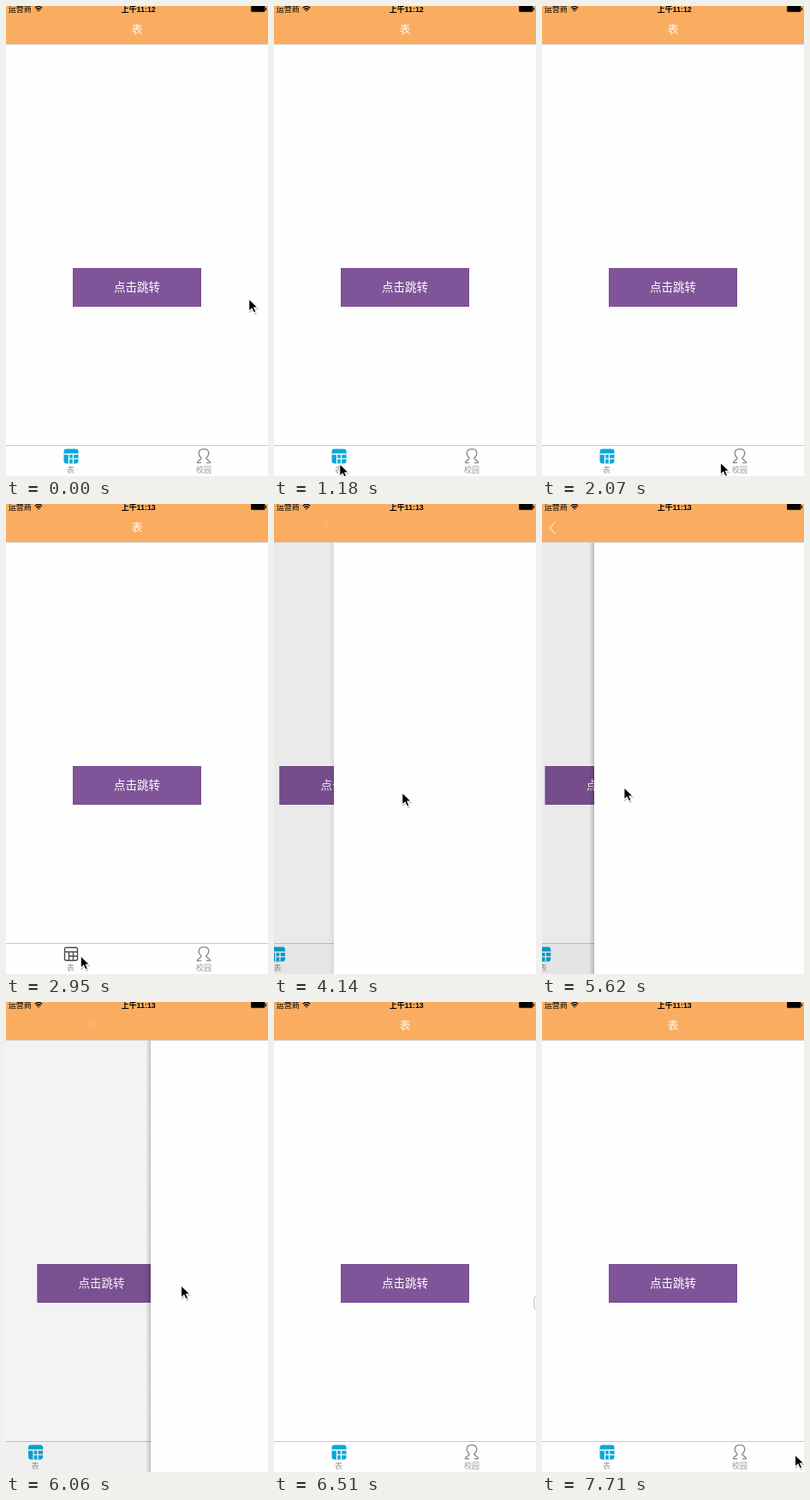
An HTML page that plays this animation: 306x547 px, repeating every 7810 ms.

```html
<!DOCTYPE html>
<html lang="zh-CN">
<head>
<meta charset="utf-8">
<style>
html, body { margin: 0; width: 100%; height: 100%; overflow: hidden; background: #fefefe; }
svg { display: block; width: 306px; height: 547px; }
text { font-family: "Noto Sans CJK SC", "Noto Sans CJK", sans-serif; text-anchor: middle; }
.status { font-size: 9px; }
#clock { font: 700 8.9px "Liberation Sans", "Noto Sans CJK SC", sans-serif; }
.label { font-size: 9px; fill: #999; }
#title { font-size: 12.5px; font-weight: 500; fill: #fff; }
</style>
</head>
<body>
<svg viewBox="0 0 306 547">
  <defs>
    <linearGradient id="shade">
      <stop offset="0" stop-opacity="0"/>
      <stop offset="1" stop-opacity=".2"/>
    </linearGradient>
  </defs>

  <g id="home">
    <rect width="306" height="547" fill="#fefefe"/>
    <g id="button">
      <rect x="78" y="305" width="150" height="45" fill="#7f5498"/>
      <rect x="78.5" y="305.5" width="149" height="44" fill="none" stroke="#784f90"/>
      <text x="153" y="332.3" font-size="13.5" fill="#fff">点击跳转</text>
    </g>
    <path d="M0 511.5H306" stroke="#c8c8c8"/>
    <g id="tableOn">
      <rect x="67.5" y="515.5" width="17" height="17" rx="3" fill="#08a9d9"/>
      <path d="M67.5 521.5H84.5M73.5 521.5V532.5M78.5 521.5V532.5M73.5 526.8H84.5" stroke="#fff" stroke-width="1.3"/>
    </g>
    <g id="tableOff" fill="none" stroke-width="1.4">
      <rect x="68.5" y="516.3" width="15" height="15" rx="2"/>
      <path d="M68.5 521.3H83.5M73.5 521.3V531M78.5 521.3V531M73.5 526.3H83.5"/>
    </g>
    <path id="person" stroke-width="1.4" stroke-linejoin="round" d="M228.3 526.3C223.8 522 224 515.6 231 515.6S238.2 522 233.7 526.3C234.5 528.8 238.6 528.6 238.6 531.6H234M228.3 526.3C227.5 528.8 223.4 528.6 223.4 531.6H228"/>
    <text class="label" x="75.5" y="543.3">表</text>
    <text class="label" x="231" y="543.3">校园</text>
    <g id="dim">
      <rect width="306" height="547" opacity=".1"/>
      <rect y="512" width="306" height="35" opacity=".03"/>
    </g>
  </g>

  <g id="page">
    <rect id="shadow" x="-6" width="6" height="547" fill="url(#shade)"/>
    <rect width="306" height="547" fill="#fefefe"/>
  </g>

  <rect width="306" height="44" fill="#faad61"/>
  <path d="M0 44.5H306" stroke="#cdc8c4"/>
  <path id="back" d="M15.5 21L8.8 27.8L15.5 34.6" fill="none" stroke="#fff" stroke-width="1.6"/>
  <text id="title" y="32">表</text>
  <text class="status" x="16.3" y="7.2">运营商</text>
  <g fill="none" stroke="#000" stroke-width="1.3">
    <path d="M33.8 2.4Q38 -1.6 42.2 2.4M35.4 4.2Q38 1.8 40.6 4.2"/>
    <path d="M37 5.3H39L38 6.3Z" fill="#000" stroke-width=".6"/>
  </g>
  <text id="clock" x="154.8" y="7"></text>
  <rect x="286.3" y="-.5" width="16" height="7.3" rx="1.2" stroke="#000" stroke-opacity=".4" stroke-width=".8"/>
  <path d="M303.6 2V5" stroke="#000"/>

  <g id="cursor">
    <path d="M1 2V17.5L4.7 14.3L7 19L9.9 17.8L7.7 13H12.5Z" opacity=".25"/>
    <path d="M.7 .8V15.2L4.1 12.1L6.4 17.1L9 16L6.8 11.1H11.3Z" stroke="#fff" stroke-width="1.1"/>
  </g>
  <rect id="edge" x="304" y="342.5" width="12" height="15" rx="2" fill="#fff" stroke="#b8b8b8"/>
</svg>

<script>
const LOOP = 7810, START = 450, STEP = 147.8, SLACK = 12, WIDTH = 306;
const PUSH = 23, DRAG = 32, DROP = 40, REST = 41;
const CYAN = "#08a9d9", GREY = "#8a8a8a";
const el = id => document.getElementById(id);
const set = (id, attrs) => {
  for (const key in attrs) el(id).setAttribute(key, attrs[key]);
};
const show = (id, on) => set(id, { opacity: on ? 1 : 0 });
const clamp = v => Math.min(1, Math.max(0, v));
const ease = f => f * f * (3 - 2 * f);

// Places where the pointer turns or rests: step, x, y
const stops = [
  [-1, 283, 340], [5, 76, 532], [8, 76, 532], [12, 232, 530], [15, 228, 530],
  [17, 86.5, 525], [19, 80, 522], [22, 149, 335], [26, 149, 335],
  [DRAG, 30, 329], [DROP, 236, 329], [REST, 310, 342], [45, 292, 560]
];

function pointer(k) {
  const i = Math.max(1, stops.findIndex(s => s[0] >= k));
  const a = stops[i - 1], b = stops[i], f = ease((k - a[0]) / (b[0] - a[0]));
  return [a[1] + (b[1] - a[1]) * f, a[2] + (b[2] - a[2]) * f];
}

function stepAt(t) {
  if (t < START) return -1;
  const k = Math.floor((t - START + SLACK) / STEP);
  return k > REST ? Math.max(REST, k - 5) : k;
}

function pageX(k, x) {
  if (k < PUSH || k >= DROP) return WIDTH;
  return k < DRAG ? WIDTH * 0.478 ** (k - PUSH) : Math.max(0, x - 34.5);
}

function draw(k) {
  const [x, y] = pointer(k);
  const left = pageX(k, x), p = left / WIDTH;
  const pushing = k < DRAG;
  const campus = k >= 12 && k < 17, pressed = k === 17;

  set("cursor", { transform: `translate(${x} ${y})` });
  show("edge", k === REST);
  set("home", { transform: `translate(${-0.303 * (WIDTH - left)} 0)` });
  set("dim", { opacity: 1 - p });
  set("page", { transform: `translate(${Math.round(left)} 0)` });
  show("page", p < 1);
  set("shadow", { opacity: pushing ? 0.3 : 1 });

  show("button", !campus);
  show("tableOn", !campus && !pressed);
  show("tableOff", campus || pressed);
  set("tableOff", { stroke: pressed ? "#4c4c4c" : GREY });
  set("person", { stroke: campus ? CYAN : GREY, fill: campus ? CYAN : "none" });

  const titleAlpha = p === 1 ? 1 : pushing ? p / 3 : clamp(2 * p - 1);
  set("title", { x: 34 + 119 * p, opacity: titleAlpha });
  el("title").textContent = campus ? "校园" : "表";
  set("back", { opacity: clamp(1 - (pushing ? 4 : 2.6) * p) });
  el("clock").textContent = k < 16 ? "上午11:12" : "上午11:13";
}

function frame() {
  draw(stepAt(performance.now() % LOOP));
  requestAnimationFrame(frame);
}
frame();
</script>
</body>
</html>
```
